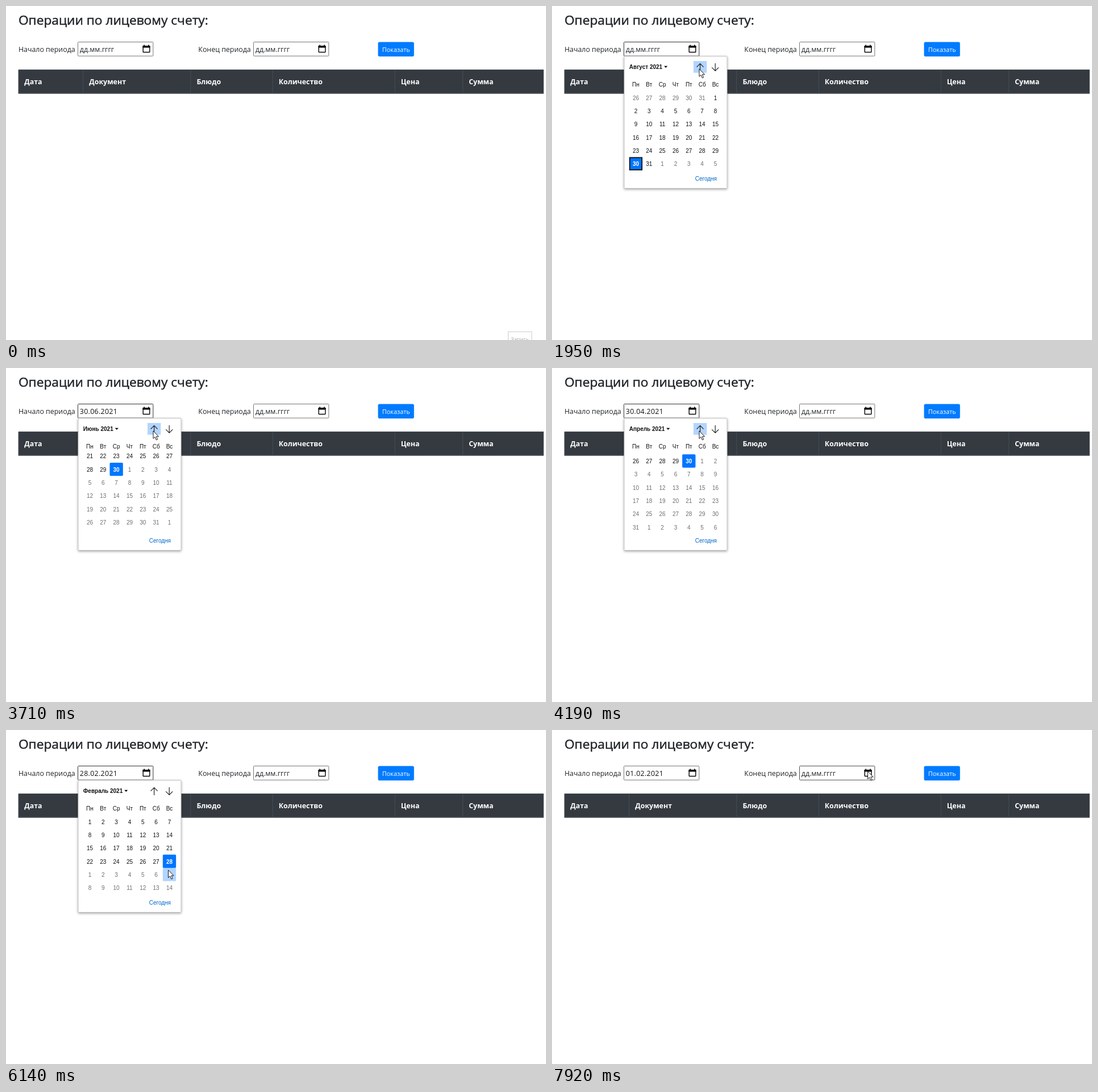
Write an HTML page that moves like this. It is 950 px wide and 589 px high and loops after 7990 ms.

```html
<!DOCTYPE html>
<html lang="ru">
<head>
<meta charset="utf-8">
<title>Операции по лицевому счету</title>
<style>
  html, body { margin: 0; width: 100%; height: 100%; overflow: hidden; background: #fff; }
  svg { display: block; width: 950px; height: 589px; }
  text { font: 12.4px "Open Sans", "Noto Sans", sans-serif; fill: #212529; white-space: pre; }
  .title { font-size: 22.7px; stroke: #212529; stroke-width: .5px; }
  .head text { font-weight: 700; fill: #fff; }
  .head path { stroke: #454d55; fill: none; }
  .field rect { fill: #fff; stroke: #767676; }
  .date { letter-spacing: .3px; fill: #111; }
  .btn { font-size: 10.85px; fill: #fff; text-anchor: middle; }
  .popup text { font: 10px "Liberation Sans", Arial, sans-serif; fill: #101010; }
  .popup .mid { text-anchor: middle; }
  .popup .bold { font-weight: 700; }
  .popup .today { fill: #0066cc; }
  .popup .out { fill: #6e6e6e; }
  .popup .on { fill: #fff; font-weight: 700; }
  .arrow { fill: none; stroke: #222; stroke-width: 1.2; }
  .hover { fill: #b2d5ff; }
  .note text { font-size: 9.3px; fill: #a8a8a8; }
  .note { animation: vanish 7990ms linear infinite; }
  @keyframes vanish { 0%, .8% { opacity: 1; } 3.5%, 100% { opacity: 0; } }
</style>
</head>
<body>
<svg viewBox="0 0 950 589">
  <defs>
    <clipPath id="grid"><rect x="130" y="150" width="175" height="140"/></clipPath>
    <filter id="shade" x="-10%" y="-10%" width="120%" height="120%">
      <feDropShadow dx="0" dy="1.5" stdDeviation="2.2" flood-color="#000" flood-opacity=".36"/>
    </filter>
    <g id="icon">
      <rect x="241.2" y="70.7" width="11.6" height="10.8" rx=".8" fill="none" stroke="#000" stroke-width="1.4"/>
      <path d="M240.5 70H253.5V73.4H240.5ZM242.3 68.6H244V71H242.3ZM250 68.6H251.7V71H250Z"/>
    </g>
  </defs>

  <text class="title" x="21.9" y="32.5">Операции по лицевому счету:</text>
  <text x="21.9" y="80.5">Начало периода</text>
  <text x="338.3" y="80.5">Конец периода</text>
  <g class="field">
    <rect id="box1" x="126.5" y="63.5" width="132.3" height="24.7" rx="1"/>
    <text id="date1" x="129.8" y="80.5">дд.мм.гггг</text>
    <use href="#icon"/>
  </g>
  <g class="field" transform="translate(309 0)">
    <rect id="box2" x="126.5" y="63.5" width="132.3" height="24.7" rx="1"/>
    <text x="129.8" y="80.5">дд.мм.гггг</text>
    <use href="#icon"/>
  </g>
  <rect x="654.5" y="63.5" width="63.3" height="25.5" rx="2.8" fill="#007bff"/>
  <text class="btn" x="686.3" y="80.5">Показать</text>

  <g class="head">
    <rect x="21.8" y="112.2" width="924" height="42.3" fill="#343a40"/>
    <path d="M22.2 112.6H945.4V153.8H22.2ZM135.7 112.2V153M324.7 112.2V153M469.3 112.2V153M684.2 112.2V153M803.7 112.2V153"/>
    <path d="M21.8 153.7H945.8" stroke-width="1.6"/>
    <text x="32.3" y="138">Дата</text>
    <text x="146.3" y="138">Документ</text>
    <text x="335.4" y="138">Блюдо</text>
    <text x="479.7" y="138">Количество</text>
    <text x="694.7" y="138">Цена</text>
    <text x="814.2" y="138">Сумма</text>
  </g>

  <g class="note">
    <rect x="883.5" y="574.5" width="41.5" height="20" fill="#fff" stroke="#ccc"/>
    <text x="888" y="590.5">Запись</text>
  </g>

  <g id="popup" class="popup">
    <rect x="127" y="88.7" width="181" height="232.8" rx="1" fill="#fff" stroke="#bfbfbf" filter="url(#shade)"/>
    <text id="month" class="bold" x="135.8" y="110.7"></text>
    <path id="drop" d="M0 105.8H6L3 109Z"/>
    <rect id="upHover" class="hover" x="249" y="97" width="23.3" height="20.7"/>
    <path class="arrow" d="M260.6 115V101.6M254.6 107.6L260.6 101.6L266.6 107.6M287.2 101V114.4M281.2 108.4L287.2 114.4L293.2 108.4"/>
    <g id="week"></g>
    <g clip-path="url(#grid)">
      <rect id="cellHover" class="hover" width="23.33" height="23.33" rx="1.5"/>
      <g id="rows"></g>
    </g>
    <text class="today" x="251.7" y="307.7">Сегодня</text>
  </g>

  <path id="cursor" d="M0 0V13.4L3.1 10.6L5.4 15.9L7.7 14.9L5.4 9.8H9.6Z" fill="#fff" stroke="#000" stroke-width=".9" stroke-linejoin="round"/>
</svg>

<script>
  const LOOP = 7990, CELL = 70 / 3, LEFT = 135.8, TOP = 149.8, SCROLL = 500;
  const OPEN = 870, PICK = 6880;
  const MONTHS = ['Январь', 'Февраль', 'Март', 'Апрель', 'Май', 'Июнь', 'Июль', 'Август'];

  // time, month index, selected day
  const picks = [[0, 7, 30], [2692, 6, 30], [3570, 5, 30], [3850, 4, 30],
                 [4138, 3, 30], [4940, 2, 30], [5037, 1, 28]];

  // time, x, y of the pointer tip
  const path = [[0, 900, 600], [70, 880, 595], [730, 239, 72], [1280, 239, 72], [1600, 219, 123],
                [1950, 259, 111], [5550, 259, 111], [5680, 279, 152], [5950, 291, 232],
                [6140, 285.5, 247], [6490, 166, 182], [6570, 156, 172], [6620, 147, 164],
                [6880, 147, 164], [7620, 528, 77], [7690, 532, 77], [7920, 555.5, 73]];

  const $ = id => document.getElementById(id);
  const clamp = v => Math.max(0, Math.min(1, v));
  const ease = p => (1 - Math.cos(Math.PI * clamp(p))) / 2;
  const two = n => String(n).padStart(2, '0');
  const show = (el, on) => { el.style.display = on ? '' : 'none'; };

  function add(parent, tag, attrs) {
    const el = document.createElementNS('http://www.w3.org/2000/svg', tag);
    for (const k in attrs) el.setAttribute(k, attrs[k]);
    return parent.appendChild(el);
  }

  const colX = c => LEFT + CELL * (c + .5);
  ['Пн', 'Вт', 'Ср', 'Чт', 'Пт', 'Сб', 'Вс'].forEach((name, c) => {
    add($('week'), 'text', { class: 'mid', x: colX(c), y: 141.5 }).textContent = name;
  });

  const mark = add($('rows'), 'rect', { fill: '#0075ff' });
  const cells = Array.from({ length: 49 }, (_, i) =>
    add($('rows'), 'text', { x: colX(i % 7), y: TOP + CELL * Math.floor(i / 7) + 15.7 }));

  const dayNo = (month, day) => Date.UTC(2021, month, day) / 864e5;
  const weekOf = day => Math.floor((day - 4) / 7);
  const firstWeek = month => weekOf(dayNo(month, 1));

  function pointer(t) {
    const i = path.findIndex(p => p[0] > t);
    if (i < 0) return path[path.length - 1].slice(1);
    const [t0, x0, y0] = path[i - 1], [t1, x1, y1] = path[i];
    const p = (t - t0) / (t1 - t0), k = t1 - t0 > 300 ? ease(p) : p;
    return [x0 + (x1 - x0) * k, y0 + (y1 - y0) * k];
  }

  function drawCalendar(t, x, y) {
    let i = picks.length - 1;
    while (picks[i][0] > t) i--;
    const [start, month, day] = picks[i];
    const goal = firstWeek(month);
    const from = i ? firstWeek(picks[i - 1][1]) : goal;
    const at = from + (goal - from) * ease((t - start) / SCROLL);
    const base = Math.floor(at), chosen = dayNo(month, day);

    $('month').textContent = MONTHS[month] + ' 2021';
    const end = 135.8 + $('month').getComputedTextLength() + 3;
    $('drop').setAttribute('transform', `translate(${end} 0)`);
    $('rows').setAttribute('transform', `translate(0 ${(base - at) * CELL})`);

    cells.forEach((el, n) => {
      const no = 4 + 7 * base + n, d = new Date(no * 864e5);
      el.textContent = d.getUTCDate();
      el.setAttribute('class', 'mid ' + (no === chosen ? 'on' : d.getUTCMonth() === month ? '' : 'out'));
    });

    // the first day shown has a dark focus frame
    const inset = i ? 0 : .9;
    const box = {
      x: LEFT + CELL * ((chosen - 4) % 7) + inset,
      y: TOP + CELL * (weekOf(chosen) - base) + inset,
      width: CELL - 2 * inset, height: CELL - 2 * inset, rx: i ? 1.7 : 0,
      stroke: i ? 'none' : '#101010', 'stroke-width': 1.8
    };
    for (const k in box) mark.setAttribute(k, box[k]);

    show($('upHover'), x > 249 && x < 272 && y > 97 && y < 118);
    const c = Math.floor((x - LEFT) / CELL), r = Math.floor((y - TOP) / CELL);
    show($('cellHover'), c >= 0 && c < 7 && r >= 0 && r < 6);
    $('cellHover').setAttribute('x', LEFT + c * CELL);
    $('cellHover').setAttribute('y', TOP + r * CELL);
    return i ? `${two(day)}.${two(month + 1)}.2021` : 'дд.мм.гггг';
  }

  function draw(t) {
    const [x, y] = pointer(t);
    $('cursor').setAttribute('transform', `translate(${x} ${y})`);

    const alpha = clamp((t - OPEN + 30) / 200) * (1 - clamp((t - PICK + 40) / 140));
    show($('popup'), t >= OPEN && alpha > 0);
    $('popup').style.opacity = alpha;

    const value = drawCalendar(t, x, y);
    $('date1').textContent = t < PICK ? value : '01.02.2021';
    $('date1').setAttribute('class', t < picks[1][0] ? '' : 'date');

    const over = left => x > left && x < left + 133 && y > 63 && y < 89;
    $('box1').style.stroke = t >= OPEN && t < PICK ? '#333' : over(126) ? '#4f4f4f' : '';
    $('box2').style.stroke = over(435) ? '#4f4f4f' : '';
  }

  const t0 = performance.now();
  function tick() {
    draw((performance.now() - t0) % LOOP);
    requestAnimationFrame(tick);
  }
  tick();
</script>
</body>
</html>
```
